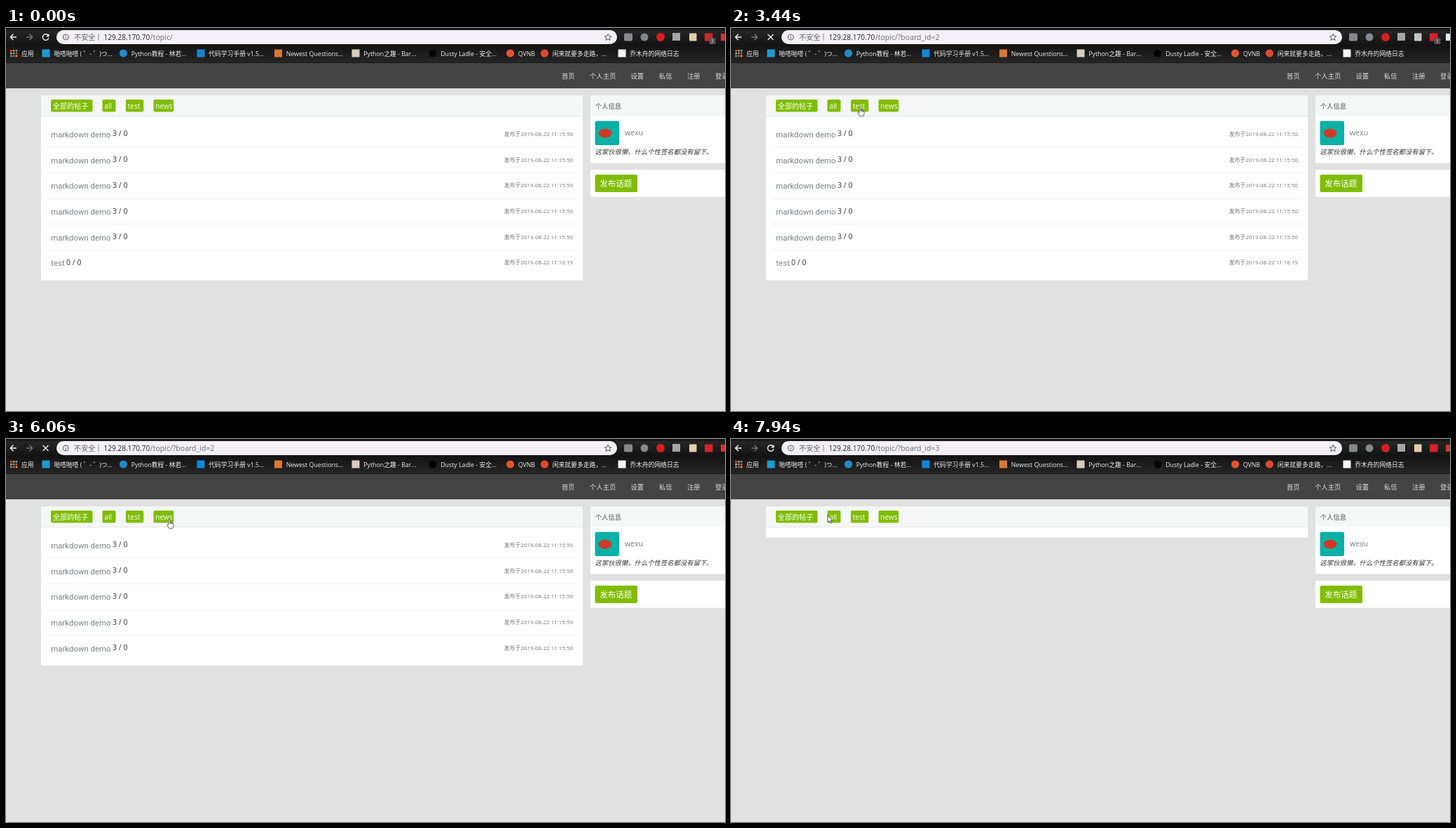
An HTML page for the animation above (8000 ms loop, 1026 by 546 pixels).

```html
<!DOCTYPE html>
<html lang="zh-CN">
<head>
<meta charset="utf-8">
<title>Forum boards</title>
<style>
html, body { margin: 0; width: 100%; height: 100%; overflow: hidden; background: #e1e1e1; }
svg { display: block; width: 100%; height: 100%; }
text { font-family: "Open Sans", "Noto Sans CJK SC", "Noto Sans CJK", sans-serif; white-space: pre; }
.title { font-family: Roboto, "Noto Sans CJK SC", sans-serif; }
</style>
</head>
<body>
<svg id="stage" viewBox="0 0 1026 546" xmlns="http://www.w3.org/2000/svg">
  <defs>
    <linearGradient id="chrome" x2="0" y2="1">
      <stop offset="0" stop-color="#0b0b0b"/>
      <stop offset=".08" stop-color="#262626"/>
      <stop offset=".48" stop-color="#131313"/>
      <stop offset="1" stop-color="#262626"/>
    </linearGradient>
  </defs>
</svg>
<script>
const LOOP = 8000;
const GREEN = '#80bd01';
const NS = 'http://www.w3.org/2000/svg';
const stage = document.getElementById('stage');

function add(parent, tag, attrs) {
  const node = document.createElementNS(NS, tag);
  for (const key in attrs) node.setAttribute(key, attrs[key]);
  return parent.appendChild(node);
}
const group = parent => add(parent, 'g', {});
const box = (parent, x, y, width, height, fill, rx = 0) =>
  add(parent, 'rect', { x, y, width, height, fill, rx });
const dot = (parent, cx, cy, r, fill) => add(parent, 'circle', { cx, cy, r, fill });
const line = (parent, d, stroke, width = 1.4) =>
  add(parent, 'path', { d, stroke, 'stroke-width': width, fill: 'none' });
function label(parent, x, y, size, fill, content, extra = {}) {
  const node = add(parent, 'text', { x, y, 'font-size': size, fill, ...extra });
  node.textContent = content;
  return node;
}
const show = (node, on) => node.setAttribute('display', on ? 'inline' : 'none');

// Browser toolbar
const bar = group(stage);
box(bar, 0, 0, 1026, 50, 'url(#chrome)');
line(bar, 'M15 13H6.5M10.5 8.8L6.3 13L10.5 17.2', '#f2f2f2');
line(bar, 'M29 13H37.5M33.5 8.8L37.7 13L33.5 17.2', '#777');
const reload = group(bar);
line(reload, 'M60.2 10.6A4.3 4.3 0 1 0 60.8 14.3', '#f2f2f2');
add(reload, 'path', { d: 'M61.5 8V12.4H57Z', fill: '#f2f2f2' });
const stop = line(bar, 'M52.5 9L60.5 17M60.5 9L52.5 17', '#f2f2f2');

box(bar, 72, 3, 800, 20, '#f3f0f7', 10);
add(bar, 'circle', { cx: 85.3, cy: 13, r: 4, fill: 'none', stroke: '#55585c' });
line(bar, 'M85.3 12.5V15.5M85.3 10.6V11.6', '#55585c', 1);
label(bar, 97, 16.8, 10.2, '#5f6368', '不安全');
line(bar, 'M132 8V18', '#85878b', 1);
label(bar, 139.5, 16.8, 10.1, '#222', '129.28.170.70');
const path = label(bar, 205.8, 16.8, 10.55, '#6b6e73', '');
line(bar, 'M859 8.4L860.4 11.6 863.8 11.9 861.2 14.1 862 17.5 859 15.7 856 17.5 856.8 14.1 854.2 11.9 857.6 11.6Z', '#555', 1);

box(bar, 882, 7.5, 12, 11, '#85878a', 2);
dot(bar, 911, 13, 5.5, '#85878a');
dot(bar, 934, 13, 6, '#d81e22');
box(bar, 951, 7, 11, 11, '#a5a5a5');
const helper = box(bar, 975, 7.5, 10.5, 11, '', 1);
box(bar, 997, 7.5, 11.5, 11, '#d8232a', 1);
const edge = box(bar, 1020, 8, 10, 10, '');
const badge = group(bar);
box(badge, 1003.5, 14, 9, 9, '#555', 1.5);
label(badge, 1008, 21.4, 7.5, '#fff', '1', { 'text-anchor': 'middle' });

// Bookmarks
const gridColors = ['#e8503a', '#f0a020', '#4aa8e0'];
for (let i = 0; i < 9; i++) {
  const col = i % 3, row = Math.floor(i / 3);
  box(bar, 6 + col * 3.8, 31 + row * 3.8, 2.6, 2.6, gridColors[(col + row) % 3]);
}
label(bar, 22, 39.6, 8.9, '#f0f0f0', '应用');
[
  [57, 'square', '#1a9bd0', '啪嗒啪嗒 ( ゜- ゜)つ...'],
  [167.5, 'circle', '#2389c9', 'Python教程 - 林若...'],
  [278, 'square', '#0f88d6', '代码学习手册 v1.5...'],
  [388.5, 'square', '#d9772e', 'Newest Questions...'],
  [499, 'square', '#d8cdbd', 'Python之趣 - Bar...'],
  [609, 'circle', '#050505', 'Dusty Ladle - 安全...'],
  [719.5, 'circle', '#e3552f', 'QVNB'],
  [768.5, 'circle', '#df4930', '闲来就要多走路，...'],
  [879, 'square', '#f4f4f4', '乔木舟的网络日志']
].forEach(([x, shape, fill, name]) => {
  if (shape === 'circle') dot(bar, x, 36, 5.6, fill);
  else box(bar, x - 5.5, 30.5, 11, 11, fill);
  label(bar, x + 11.2, 39.6, 8.8, '#f0f0f0', name);
});
line(bar, 'M0 49.5H1026', '#191919', 1);

// Forum page
const page = group(stage);
box(page, 0, 50, 1026, 36, '#444');
[[793, '首页'], [833, '个人主页'], [891.5, '设置'], [931.8, '私信'], [972, '注册'], [1012, '登录']]
  .forEach(([x, name]) => label(page, x, 72, 9.35, '#ddd', name));

const panel = box(page, 50, 96, 773, 264, '#fff', 2);
box(page, 50, 96, 773, 29, '#f5f6f6', 2);
line(page, 'M50 125.5H823', '#e3e5e4', 1);

const buttons = [
  [64, 59.5, '全部的帖子'], [137.5, 19, 'all'], [171, 25.3, 'test'], [210.5, 28.7, 'news']
];
buttons.forEach(([x, width, name]) => {
  box(page, x, 102, width, 17.5, GREEN, 2);
  label(page, x + 2.8, 114.8, 10.1, '#fff', name);
});

const rows = Array.from({ length: 6 }, (_, i) => {
  const row = group(page), y = i * 36.7, last = i === 5;
  if (i) line(row, `M57 ${Math.round(132.5 + y) + .5}H816`, '#f0f0f0', 1);
  label(row, 64.3, 155.8 + y, 11.4, '#778087', last ? 'test' : 'markdown demo', { class: 'title' });
  label(row, last ? 86 : 152, 154.4 + y, 10.6, '#333', last ? '0 / 0' : '3 / 0');
  label(row, 809, 153.8 + y, 7.9, '#777', '发布于2019-08-22 11:1' + (last ? '6:19' : '5:50'), { 'text-anchor': 'end' });
  return row;
});

box(page, 834, 96, 200, 96.5, '#fff', 2);
box(page, 834, 96, 200, 29, '#f5f6f6', 2);
label(page, 840.7, 114.7, 9.35, '#51585c', '个人信息');
box(page, 840.5, 132.5, 34.5, 34.5, '#0aafa6', 2.5);
add(page, 'ellipse', { cx: 855, cy: 150, rx: 9.5, ry: 6.5, fill: '#cf3a24' });
label(page, 882.7, 153, 10.8, '#778087', 'wexu');
label(page, 840.5, 180, 9.35, '#333', '这家伙很懒，什么个性签名都没有留下。', { 'font-style': 'italic' });
box(page, 834, 202, 200, 38.7, '#fff', 2);
box(page, 840.5, 209, 60.5, 25, GREEN, 2);
label(page, 847.3, 225.8, 11.5, '#fff', '发布话题');

// Pointer
const ink = { fill: '#fff', stroke: '#333', 'stroke-width': .75, 'stroke-linejoin': 'round' };
const arrow = add(stage, 'path', { d: 'M0 0V9.7L2.2 7.7 3.8 11 5.4 10.3 4 7.1H6.8Z', ...ink });
const hand = add(stage, 'path', {
  d: 'M-1 .9C-1-.3 1-.3 1 .9V4.8L4.7 5.6Q6 6 6 7.3V9.5L4.9 13.3H-.4L-3 8.8C-3.4 7.3-2 7.1-1 8.4ZM1 4.8V7M2.9 5.2V7.2M4.6 5.6V7.6',
  ...ink
});

const moves = [
  { from: 330, to: 1110, steps: 10, a: [863, 515], b: [195, 134], ease: p => 1 - (1 - p) ** 2 },
  { from: 1114, to: 1570, steps: 6, a: [195, 134], b: [184.5, 113] },
  { from: 5064, to: 5750, steps: 9, a: [184, 112.4], b: [233, 114], dip: 8 },
  { from: 7311, to: 7940, steps: 8, a: [233, 114], b: [138, 109] }
];

function pointerAt(t) {
  if (t < 330) return null;
  if (t >= 1730 && t < 5064) return [t < 2120 ? 184.5 : 184, 112.4];
  const { from, to, steps, a, b, dip = 0, ease = p => p } = moves.filter(m => t >= m.from).pop();
  const tick = Math.floor((t - from) / (to - from) * steps + .02);
  const p = Math.min(1, tick / steps), e = ease(p);
  return [a[0] + (b[0] - a[0]) * e, a[1] + (b[1] - a[1]) * e + dip * Math.sin(Math.PI * p)];
}

const between = (t, from, to) => t >= from && t < to;

function draw(t) {
  const loading = between(t, 2520, 4450) || between(t, 6060, 7470);
  const muted = between(t, 3440, 4450) || between(t, 6770, 7470);
  const count = t < 4370 ? 6 : t < 6770 ? 5 : 0;

  show(stop, loading);
  show(reload, !loading);
  show(badge, t < 4450);
  helper.setAttribute('fill', muted ? '#c3c8c6' : '#e6cda6');
  edge.setAttribute('fill', muted ? '#e3e9f0' : '#d8332e');
  path.textContent = '/topic/' + (t < 3440 ? '' : t < 6770 ? '?board_id=2' : '?board_id=3');

  show(page, !between(t, 6770, 6930));
  rows.forEach((row, i) => show(row, i < count));
  panel.setAttribute('height', count ? 43.6 + count * 36.7 : 44.7);

  const pos = pointerAt(t);
  const over = pos && pos[1] > 102 && pos[1] < 119.5 &&
    buttons.some(([x, width]) => pos[0] > x + 1 && pos[0] < x + width);
  show(hand, over);
  show(arrow, pos && !over);
  if (pos) (over ? hand : arrow).setAttribute('transform', `translate(${pos})`);
}

const start = performance.now();
function frame(now) {
  draw(Math.max(0, now - start) % LOOP);
  requestAnimationFrame(frame);
}
draw(0);
requestAnimationFrame(frame);
</script>
</body>
</html>
```
